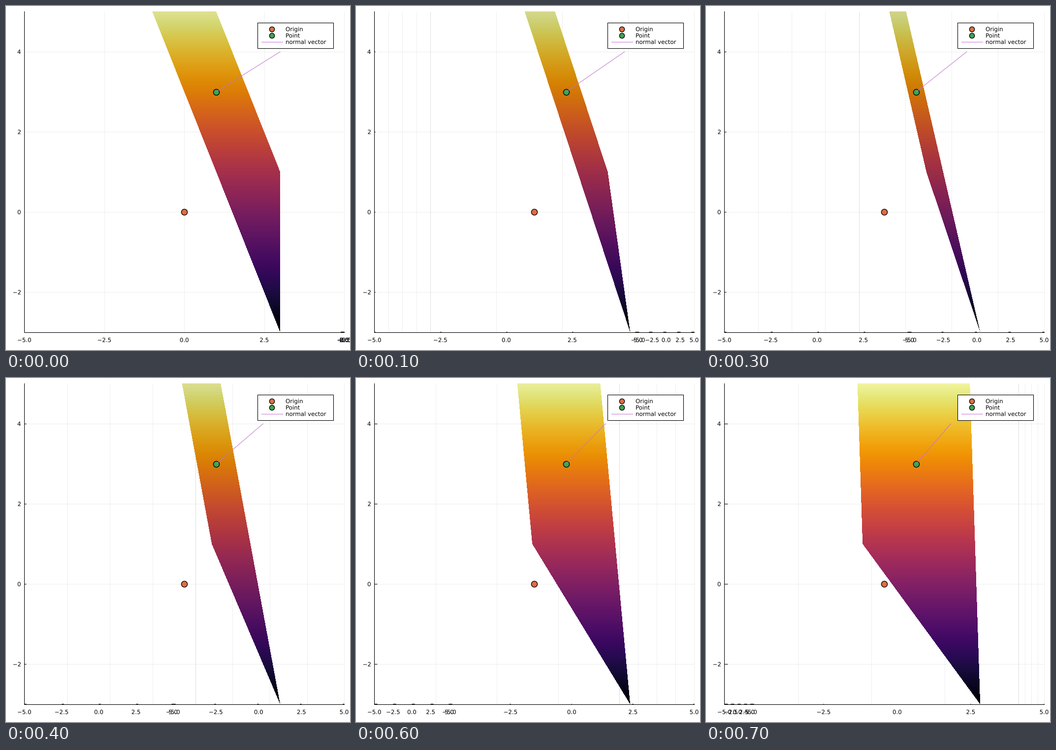
Recreate the animation shown at these times as a matplotlib script. Size 699x700 px, loop 3000 ms.

```python
import numpy as np
import matplotlib as mpl
import matplotlib.pyplot as plt
from matplotlib.animation import FuncAnimation
from matplotlib.collections import LineCollection
from matplotlib.patches import PathPatch, Rectangle
from matplotlib.textpath import TextPath
from matplotlib.transforms import Affine2D

W, H, DPI = 699, 700, 100
PX = 72 / DPI                      # points per pixel
LEFT, RIGHT, TOP, BOTTOM = 37.4, 687.1, 11.45, 663.9
LIM, Z_MIN, Z_MAX = 5, -3, 5
TICKS = np.linspace(-LIM, LIM, 5)
TICK_LEN = 7.5
FONT_SIZE = 11.8
STEPS, MAX_AZIMUTH = 14, 85
FRAMES, INTERVAL = 60, 50

ORANGE, GREEN, PURPLE = "#dd6e44", "#3ea44e", "#c371d2"

# Plane 2x + y + z = 6 on [-1, 3]^2, cut off at z = 5
POINT, NORMAL = np.array([1, 1, 3]), np.array([2, 1, 1])

mpl.rcParams["font.family"] = "DejaVu Sans"

fig = plt.figure(figsize=(W / DPI, H / DPI), dpi=DPI, facecolor="white")
ax = fig.add_axes([0, 0, 1, 1])


def sx(x, y, c, s):
    """Screen x of a point seen level from the azimuth with cosine c, sine s."""
    u = (c * x + s * y) / (c + s)
    return LEFT + (u + LIM) / (2 * LIM) * (RIGHT - LEFT)


def sy(z):
    return BOTTOM - (z - Z_MIN) / (Z_MAX - Z_MIN) * (BOTTOM - TOP)


def fmt(v, digits):
    return f"{v:.{digits}f}".replace("-", "\u2212")


def dot(x, y, size, color, z):
    ax.plot(x, y, "o", ms=size * PX, mfc=color, mec="black",
            mew=1.35 * PX, zorder=z)


def lines(width, z, **style):
    return ax.add_collection(LineCollection([], linewidths=width * PX,
                                            zorder=z, **style), autolim=False)


def place(label, x, y):
    label.set_transform(Affine2D().scale(1, -1).translate(x, y) + ax.transData)


def text(x, y, string, align="left"):
    """Outline text on the baseline y, so that it can sit between pixels."""
    path = TextPath((0, 0), string, size=FONT_SIZE)
    box = path.get_extents()
    shift = {"left": 0, "center": (box.x0 + box.x1) / 2, "right": box.x1}[align]
    path = path.transformed(Affine2D().translate(-shift, 0))
    label = PathPatch(path, fc="black", lw=0, snap=False, zorder=6)
    ax.add_artist(label)
    place(label, x, y)
    return label


# Colour by height, one value per pixel row
row_z = Z_MIN + (BOTTOM - np.arange(H) - 0.5) / (BOTTOM - TOP) * (Z_MAX - Z_MIN)
col_x = np.arange(W) + 0.5
pixels = np.zeros((H, W, 4))
ramp = mpl.colormaps["inferno"]((row_z - Z_MIN) / (Z_MAX - Z_MIN))[:, None, :3]
in_range = (row_z >= Z_MIN) & (row_z <= Z_MAX)
surface = ax.imshow(pixels, extent=(0, W, H, 0), aspect="auto",
                    interpolation="nearest", zorder=2)
ax.set(xlim=(0, W), ylim=(H, 0))
ax.axis("off")

grid = lines(1, 0, colors="black", alpha=0.065)
ticks = lines(1.1, 1, colors="black")
ax.plot([LEFT, LEFT, RIGHT], [TOP, BOTTOM, BOTTOM], color="black",
        lw=1.1 * PX, zorder=1)

z_ticks = range(-2, 5, 2)
for v in z_ticks:
    text(29.7, sy(v) + 4.4, fmt(v, 0), "right")
LABEL_Y = 683.8
x_labels, y_labels = ([text(0, LABEL_Y, fmt(v, 1), "center") for v in TICKS]
                      for _ in range(2))

dot(sx(0, 0, 1, 0), sy(0), 12.2, ORANGE, 3)
dot(sx(1, 1, 1, 0), sy(3), 12.2, GREEN, 3)
normal, = ax.plot([], [], color=PURPLE, lw=PX, zorder=4)

# Legend
ax.add_patch(Rectangle((511, 34), 154, 52, fc="white", ec="black",
                       lw=1.1 * PX, zorder=5))
dot(540, 47, 10.3, ORANGE, 6)
dot(540, 60, 10.3, GREEN, 6)
ax.plot([519, 562], [73, 73], color=PURPLE, lw=PX, zorder=6)
for i, name in enumerate(("Origin", "Point", "normal vector")):
    text(568, 51.2 + 13 * i, name)


def update(frame):
    azimuth = np.radians(round(MAX_AZIMUTH * min(frame, STEPS) / STEPS))
    c, s = np.cos(azimuth), np.sin(azimuth)

    # The surface is lit more the more it faces the viewer
    facing = abs(NORMAL[0] * s - NORMAL[1] * c) / np.linalg.norm(NORMAL)
    tip = sx(3, 3, c, s)
    back = np.interp(row_z, [-3, 5], [tip, sx(-1, 3, c, s)])
    front = np.interp(row_z, [-3, 1, 5],
                      [tip, sx(3, -1, c, s), sx(1, -1, c, s)])
    near, far = np.minimum(back, front), np.maximum(back, front)
    pixels[..., :3] = ramp * (0.8 + 0.2 * facing)
    pixels[..., 3] = (in_range[:, None] & (col_x >= near[:, None])
                      & (col_x <= far[:, None]))
    surface.set_data(pixels)

    ends = np.array([POINT, POINT + NORMAL])
    normal.set_data(sx(ends[:, 0], ends[:, 1], c, s), sy(ends[:, 2]))

    walls = [*sx(TICKS, LIM, c, s), *sx(-LIM, TICKS, c, s)]
    grid.set_segments([[(w, TOP), (w, BOTTOM)] for w in walls]
                      + [[(LEFT, sy(v)), (RIGHT, sy(v))] for v in z_ticks])

    x_pos, y_pos = sx(TICKS, -LIM, c, s), sx(LIM, TICKS, c, s)
    for label, p in zip(x_labels + y_labels, [*x_pos, *y_pos]):
        place(label, p, LABEL_Y)

    dx, dy = TICK_LEN * s / (c + s), TICK_LEN * c / (c + s)
    base = BOTTOM - 1
    ticks.set_segments([[(p, base), (p + dx, base)] for p in x_pos]
                       + [[(p, base), (p - dy, base)] for p in y_pos]
                       + [[(LEFT, sy(v)), (LEFT + dx, sy(v))] for v in z_ticks])
    return surface, normal, grid, ticks, *x_labels, *y_labels


anim = FuncAnimation(fig, update, frames=FRAMES, interval=INTERVAL,
                     init_func=lambda: update(0), repeat=True, repeat_delay=0)
plt.show()
```
